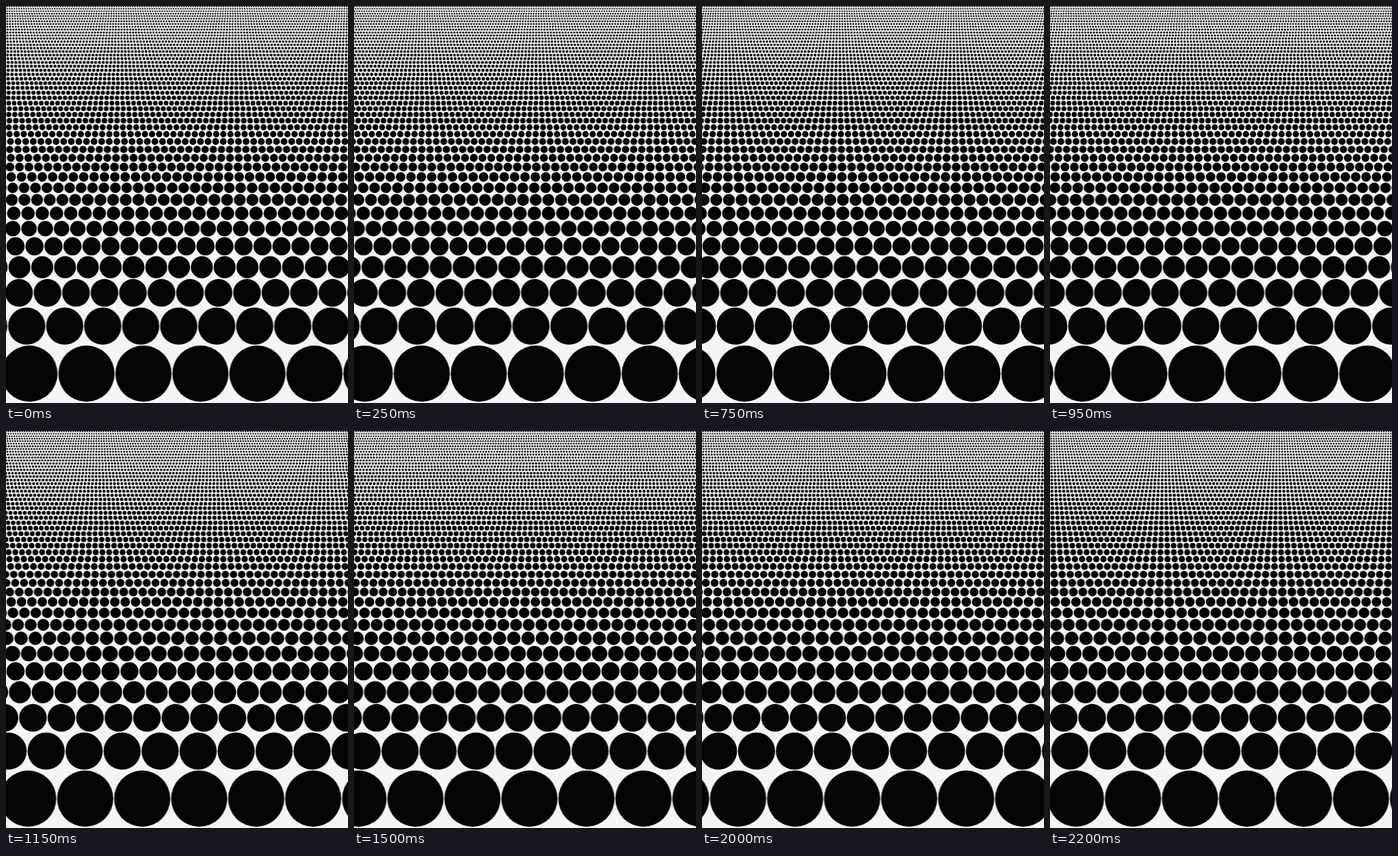
These frames come from a looping animation (500x580 px, 2.25 s). An HTML page:

```html
<!DOCTYPE html>
<html lang="en">
<head>
<meta charset="utf-8">
<title>Sliding dots</title>
<style>
  html, body {
    margin: 0;
    width: 100%;
    height: 100%;
    overflow: hidden;
    background: #f4f4f4;
  }
  svg {
    display: block;
    width: 500px;
    height: 580px;
  }
  /* Each row is one line whose zero-length dashes become round dots. */
  line {
    stroke: #040404;
    stroke-linecap: round;
    animation: slide 2250ms steps(45) -100ms infinite;
  }
  @keyframes slide {
    from { transform: translateX(0); }
    to { transform: translateX(var(--shift)); }
  }
</style>
</head>
<body>
<svg viewBox="0 0 500 580"></svg>
<script>
  const WIDTH = 500;
  const ROWS = 48;
  const BASE = 578.8;
  const GAP = 1.2;
  // Whole cells travelled per loop, repeating up the rows.
  const TURNS = [-2, 1, -1, 2, 0];

  const svg = document.querySelector("svg");
  let bottom = BASE;

  for (let row = 0; row < ROWS; row++) {
    const cell = WIDTH / (3 * (row + 2));
    const y = bottom - cell / 2;
    const line = document.createElementNS(svg.namespaceURI, "line");
    const attrs = {
      x1: -2.5 * cell,
      x2: WIDTH + 2.6 * cell,
      y1: y,
      y2: y,
      "stroke-width": cell - GAP,
      "stroke-dasharray": `0 ${cell}`
    };
    for (const name in attrs) line.setAttribute(name, attrs[name]);
    line.style.setProperty("--shift", `${TURNS[row % TURNS.length] * cell}px`);
    svg.append(line);
    bottom -= cell;
  }
</script>
</body>
</html>
```
